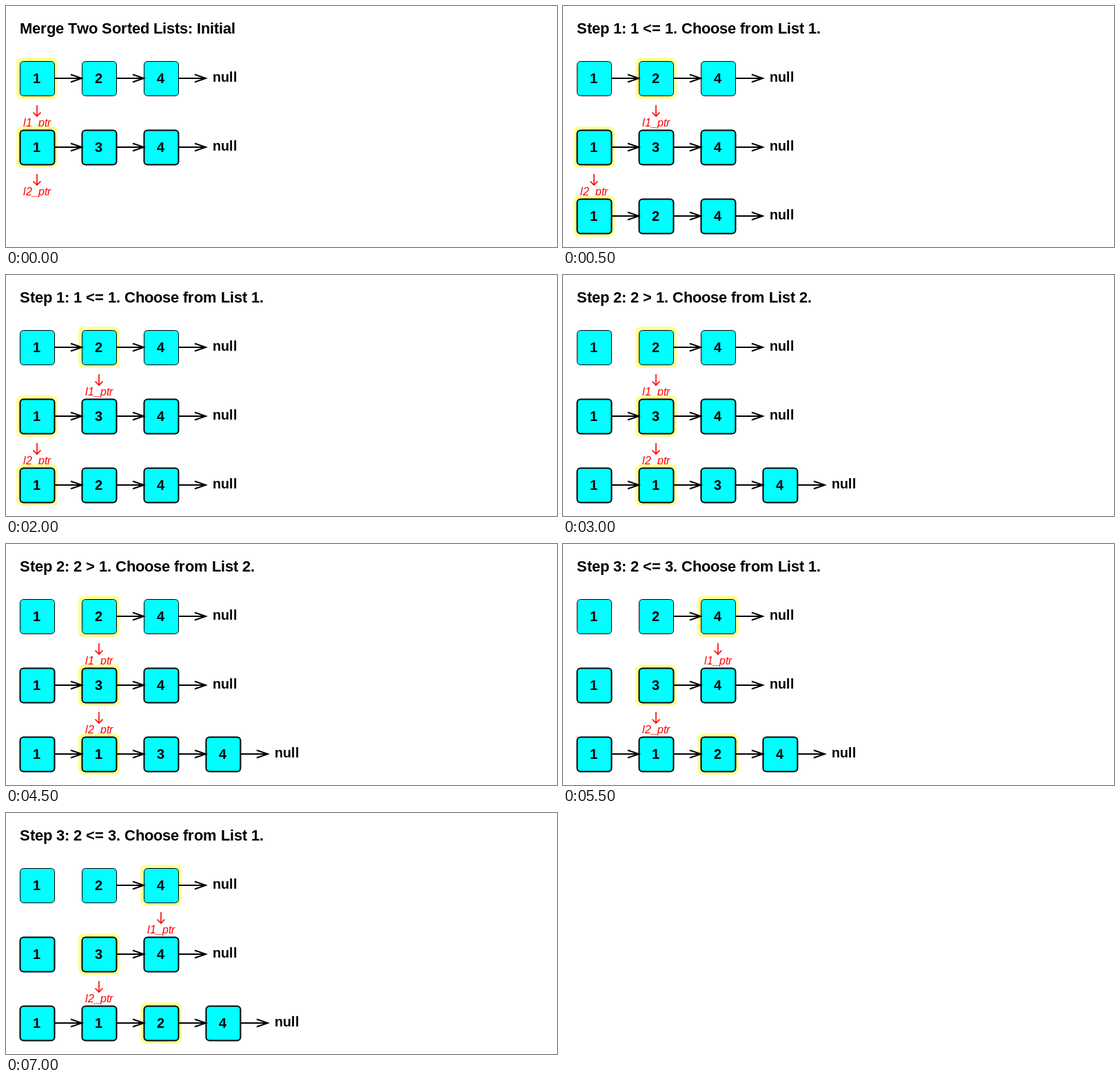
Animation, 800 px wide and 350 px high, one loop 8000 ms. Source, as an HTML page with a canvas:

```html
<!DOCTYPE html>
<html>
<head>
<meta charset="utf-8">
<style>
  html, body { margin: 0; overflow: hidden; background: #fff; }
  canvas { display: block; }
</style>
</head>
<body>
<canvas width="800" height="350"></canvas>
<script>
const ctx = document.querySelector('canvas').getContext('2d');
const LOOP = 8000, SIZE = 50, STEP = 90, LEFT = 20;

// Each row: values, active index, number of detached leading nodes, pointer label
const row = (values, active, detached, label) => ({ values, active, detached, label });
const l1 = (active, detached) => row([1, 2, 4], active, detached, 'l1_ptr');
const l2 = (active, detached) => row([1, 3, 4], active, detached, 'l2_ptr');
const scenes = [
  { start: 0, title: 'Merge Two Sorted Lists: Initial',
    rows: [l1(0, 0), l2(0, 0)] },
  { start: 500, title: 'Step 1: 1 <= 1. Choose from List 1.',
    rows: [l1(1, 0), l2(0, 0), row([1, 2, 4], 0, 0)] },
  { start: 3000, title: 'Step 2: 2 > 1. Choose from List 2.',
    rows: [l1(1, 1), l2(1, 0), row([1, 1, 3, 4], 1, 0)] },
  { start: 5500, title: 'Step 3: 2 <= 3. Choose from List 1.',
    rows: [l1(2, 1), l2(1, 1), row([1, 1, 2, 4], 2, 0)] },
];

// Text on whole-pixel advances
function text(str, x, y, font, color = '#000') {
  ctx.font = font + ' "Liberation Sans", Arial, sans-serif';
  ctx.fillStyle = color;
  for (const ch of str) {
    ctx.fillText(ch, x, y);
    x += Math.round(ctx.measureText(ch).width);
  }
}

function lines(color, ...paths) {
  ctx.strokeStyle = color;
  ctx.beginPath();
  for (const [first, ...rest] of paths) {
    ctx.moveTo(...first);
    rest.forEach(p => ctx.lineTo(...p));
  }
  ctx.stroke();
}

function roundRect(x, y, size, radius, fill) {
  ctx.beginPath();
  ctx.roundRect(x, y, size, size, radius);
  ctx.fillStyle = fill;
  ctx.fill();
}

function drawNode(value, x, y, active, lineWidth) {
  if (active) roundRect(x - 5, y - 5, SIZE + 10, 7.5, '#ffff96');
  roundRect(x + .5, y + .5, SIZE, 5, '#0ff');
  ctx.lineWidth = lineWidth;
  ctx.strokeStyle = '#000';
  ctx.stroke();
  text(String(value), x + 19, y + 32, 'bold 20px');
}

function drawRow({ values, active, detached, label }, i) {
  const y = 80 + i * 100, mid = y + 25;
  values.forEach((v, k) => drawNode(v, LEFT + k * STEP, y, k === active, i ? 2 : 1));
  ctx.lineWidth = 2;
  values.forEach((v, k) => {
    if (k < detached) return;
    const from = LEFT + k * STEP + SIZE, tip = from + 40;
    lines('#000', [[from, mid], [tip, mid]],
      [[tip - 16, mid - 5.5], [tip, mid], [tip - 16, mid + 5.5]]);
  });
  text('null', LEFT + values.length * STEP + 10, y + 30, 'bold 20px');
  if (!label) return;
  const x = LEFT + active * STEP + 25;
  ctx.lineWidth = 1.6;
  lines('#f00', [[x, y + 64], [x, y + 80]],
    [[x - 5.5, y + 74.5], [x, y + 80], [x + 5.5, y + 74.5]]);
  text(label, x - 20, y + 95, 'italic 16px', '#f00');
}

function frame(now) {
  const t = now % LOOP;
  const scene = scenes.findLast(s => s.start <= t);
  ctx.fillStyle = '#fff';
  ctx.fillRect(0, 0, 800, 350);
  text(scene.title, LEFT, 40, 'bold 22px');
  scene.rows.forEach(drawRow);
  requestAnimationFrame(frame);
}
requestAnimationFrame(frame);
</script>
</body>
</html>
```
